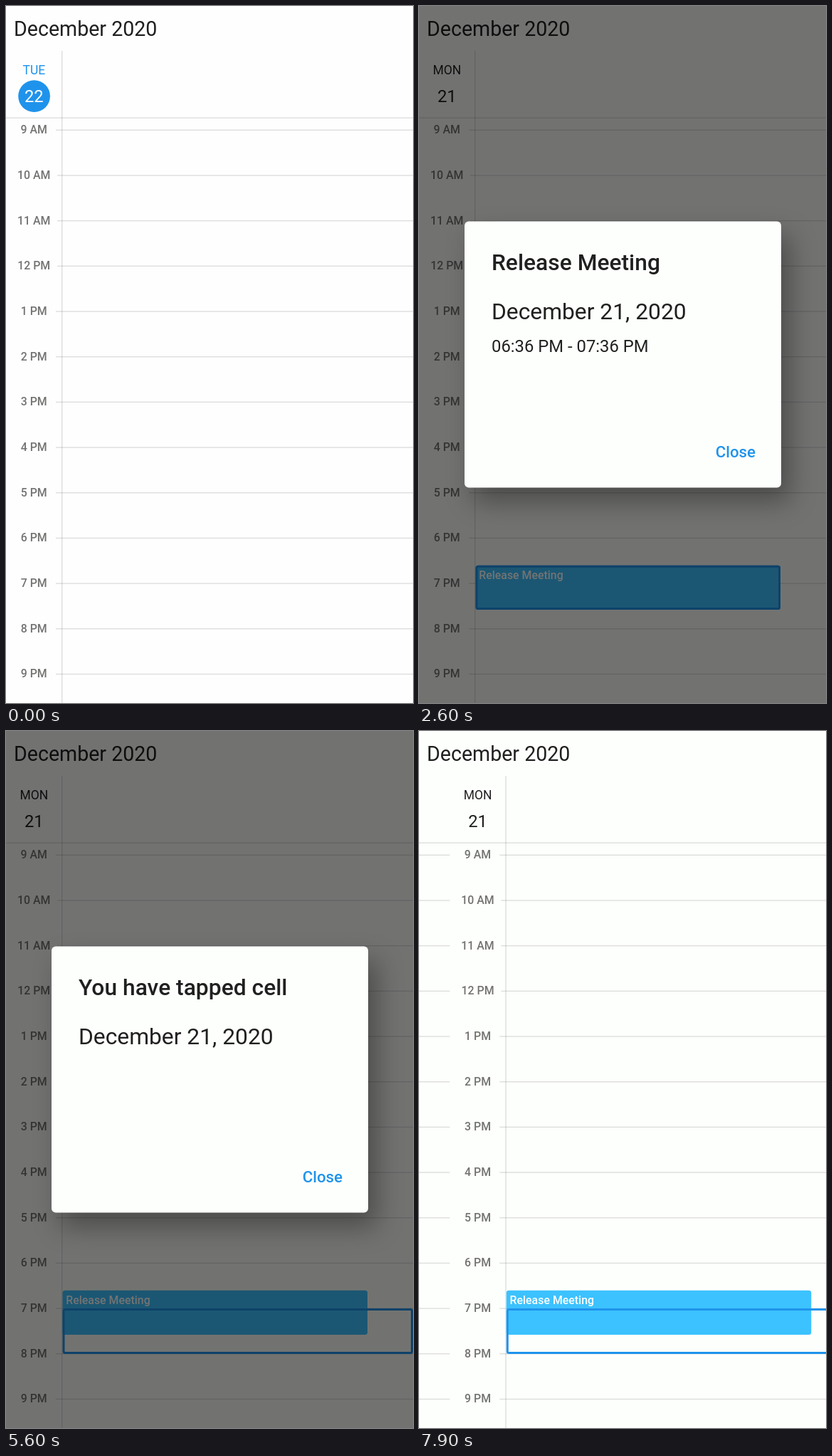
Animation of 572x979 px, one loop 8 s. Source, as an HTML page with a canvas:

```html
<!DOCTYPE html>
<html lang="en">
<head>
<meta charset="utf-8">
<title>Day calendar</title>
<style>
  html, body { margin: 0; width: 100%; height: 100%; overflow: hidden; background: #fdfffc; }
  canvas { display: block; width: 572px; height: 979px; }
</style>
</head>
<body>
<canvas id="stage" width="572" height="979"></canvas>
<script>
const W = 572, H = 979, LOOP = 8000, STEP = 100;
const DP = W / 360;
const BLUE = '#1f93ec', SKY = '#3cc2ff', INK = '#1f201f', PAPER = '#fdfffc';
const RULE = 'rgba(0,0,0,.13)', GUTTER = 78, ROW = 63.68;

const stage = document.getElementById('stage');
const ctx = stage.getContext('2d');
const layer = document.createElement('canvas');
layer.width = W;
layer.height = H;
const dlg = layer.getContext('2d');

const clamp = v => Math.max(0, Math.min(1, v));
const smooth = v => { v = clamp(v); return v * v * (3 - 2 * v); };
const swipe = (t, start) => W * smooth((t - start) / 255);

function text(c, str, x, y, dp, color, weight = 400, align = 'left') {
  c.font = `${weight} ${dp * DP}px Roboto, sans-serif`;
  c.textAlign = align;
  c.fillStyle = color;
  c.fillText(str, x, y);
}

function box(c, x, y, w, h, r, color) {
  c.beginPath();
  c.roundRect(x, y, w, h, r);
  c.fillStyle = color;
  c.fill();
}

function outline(x, y, w, h) {
  ctx.beginPath();
  ctx.roundRect(x + 1.5, y + 1.5, w - 3, h - 3, 2);
  ctx.lineWidth = 3;
  ctx.strokeStyle = BLUE;
  ctx.stroke();
}

function hourLabel(i) {
  const hour = 9 + i;
  return `${(hour + 11) % 12 + 1} ${hour < 12 ? 'AM' : 'PM'}`;
}

function drawDay(x, day, selection) {
  if (x <= -W || x >= W) return;
  ctx.save();
  ctx.translate(x, 0);

  ctx.fillStyle = RULE;
  ctx.fillRect(GUTTER, 63, 1.4, H);
  ctx.fillRect(0, 156.4, W, 1.4);
  for (let i = 0; i <= 12; i++) {
    const y = 174.3 + i * ROW, label = hourLabel(i);
    const left = label.length > 4 ? 72 : 70;
    ctx.fillStyle = RULE;
    ctx.fillRect(left, y - 0.7, W - left, 1.4);
    text(ctx, label, 39.2, y + 5, 10, '#737472', 500, 'center');
  }

  if (day.today) {
    ctx.beginPath();
    ctx.arc(39.6, 126.6, 22.4, 0, Math.PI * 2);
    ctx.fillStyle = BLUE;
    ctx.fill();
  }
  text(ctx, day.name, 39.3, 96.3, 11, day.today ? BLUE : INK, 400, 'center');
  text(ctx, day.date, 39.3, 135, 15, day.today ? '#fff' : INK, 400, 'center');

  if (day.event) {
    box(ctx, 79.5, 785.7, 428.5, 62.2, 3.5, SKY);
    text(ctx, day.event, 84.3, 805.2, 10, '#fff', 500);
    if (selection === 'event') outline(79.5, 785.7, 428.5, 62.2);
    if (selection === 'cell') outline(79.5, 811, W - 79.5, 64);
  }
  ctx.restore();
}

function drawDialog({ title, time }, alpha, pressed) {
  if (alpha <= 0) return;
  ctx.fillStyle = `rgba(0,0,0,${0.55 * alpha})`;
  ctx.fillRect(0, 0, W, H);

  dlg.clearRect(0, 0, W, H);
  dlg.save();
  dlg.shadowColor = 'rgba(0,0,0,.34)';
  dlg.shadowBlur = 36;
  dlg.shadowOffsetX = 12;
  dlg.shadowOffsetY = 20;
  box(dlg, 64, 302.5, 445, 374, 6, PAPER);
  dlg.restore();
  if (pressed) box(dlg, 395, 598, 100, 57, 3, 'rgba(0,0,0,.05)');
  text(dlg, title, 102, 371, 20, INK, 500);
  text(dlg, 'December 21, 2020', 102, 439.8, 20, INK);
  if (time) text(dlg, time, 102, 486.2, 15, INK);
  text(dlg, 'Close', 416.7, 633.8, 14, BLUE, 500);

  ctx.globalAlpha = alpha;
  ctx.drawImage(layer, 0, 0);
  ctx.globalAlpha = 1;
}

const sunday = { name: 'SUN', date: '20' };
const monday = { name: 'MON', date: '21', event: 'Release Meeting' };
const tuesday = { name: 'TUE', date: '22', today: true };
const meeting = { title: 'Release Meeting', time: '06:36 PM - 07:36 PM' };
const cell = { title: 'You have tapped cell' };

// Opacity of a dialog that fades in from `open` and out from `close`.
function fade(t, open, close) {
  const shown = clamp((t - open) / 150);
  const left = 1 - clamp((t - close) / 150);
  return shown * left;
}

function draw(t) {
  ctx.fillStyle = t < 1100 ? '#fefefe' : PAPER;
  ctx.fillRect(0, 0, W, H);
  text(ctx, 'December 2020', 11, 41.6, 18, INK);

  const selection = t >= 5500 ? 'cell' : t >= 2600 ? 'event' : '';
  const shift = swipe(t, 1057) + swipe(t, 7857);
  drawDay(shift, tuesday);
  drawDay(shift - W, monday, selection);
  drawDay(shift - 2 * W, sunday);

  drawDialog(meeting, fade(t, 2450, 4105), false);
  drawDialog(cell, fade(t, 5430, 7004), t >= 6900);
}

function tick(now) {
  draw(Math.floor(now % LOOP / STEP) * STEP);
  requestAnimationFrame(tick);
}
requestAnimationFrame(tick);
</script>
</body>
</html>
```
